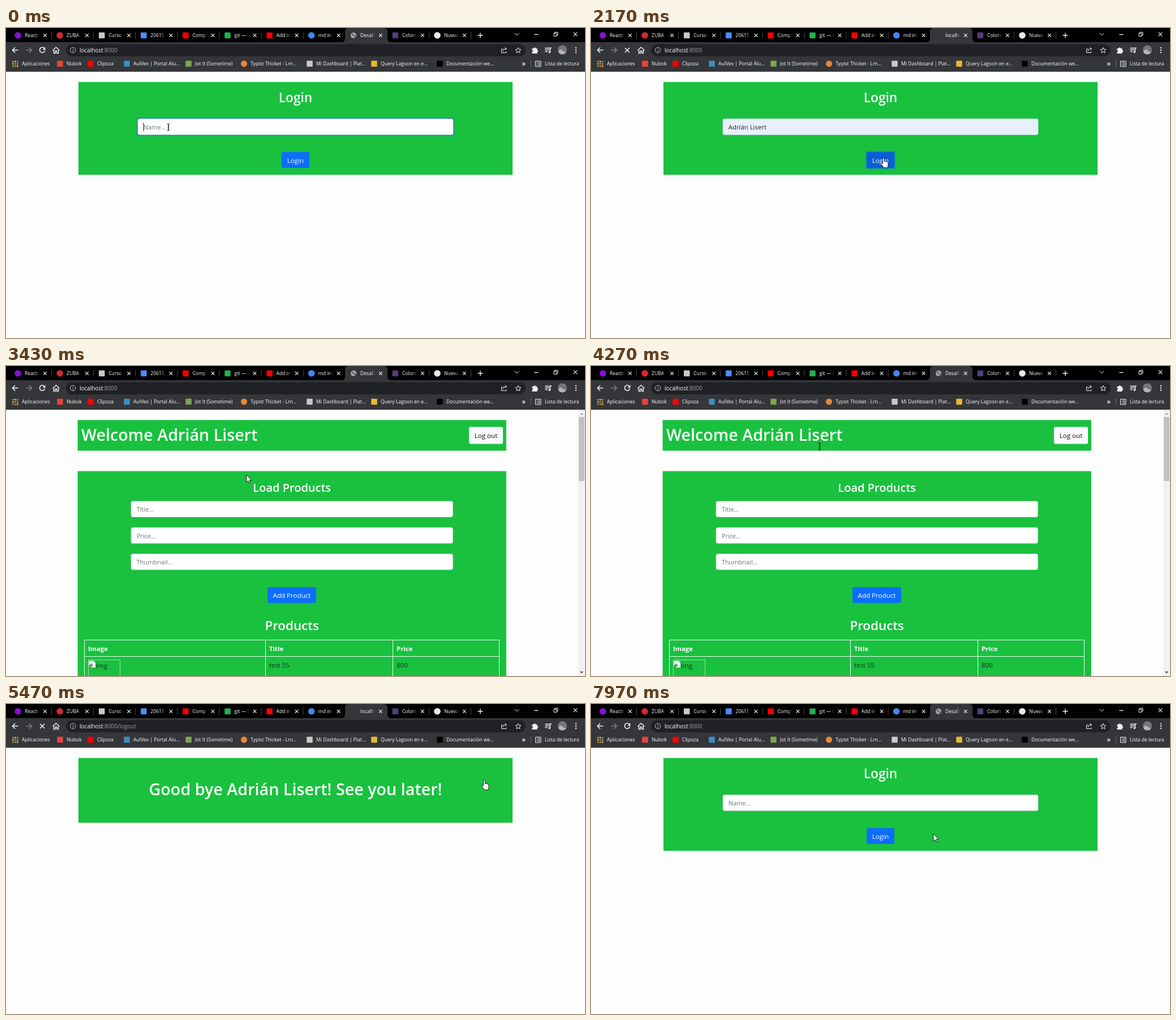
An HTML page for the animation above (8000 ms loop, 1023 by 547 pixels).

```html
<!DOCTYPE html>
<html lang="es">
<head>
<meta charset="utf-8">
<title>Login demo</title>
<style>
  html, body { margin: 0; width: 100%; height: 100%; overflow: hidden; background: #fdfdfd; }
  svg { display: block; }
  text { font-family: "Open Sans", "Noto Sans", sans-serif; white-space: pre; }
  .ui { font-size: 8.6px; fill: #fff; }
  .url { font-size: 9.9px; fill: #fff; }
  .dim { fill: #9aa0a6; }
  .body { font-size: 11.4px; fill: #212529; }
  .hint { font-size: 11px; fill: #6c757d; }
  .btn { font-size: 11.6px; text-anchor: middle; }
  .head { font-weight: 600; fill: #fff; }
  .mid { text-anchor: middle; }
  .line { fill: none; stroke: #f1f3f4; stroke-width: 1.4; }
</style>
</head>
<body>
<svg id="stage" width="1023" height="547" viewBox="0 0 1023 547"></svg>
<script>
const LOOP = 8000;
const USER = 'Adrián Lisert';
const GREEN = '#19c13f', BAR = '#35363a', BLUE = '#0d6efd';

const rect = (x, y, w, h, fill, r = 0, more = '') =>
  `<rect x="${x}" y="${y}" width="${w}" height="${h}" rx="${r}" fill="${fill}" ${more}/>`;
const dot = (x, y, r, fill) => `<circle cx="${x}" cy="${y}" r="${r}" fill="${fill}"/>`;
const square = (x, y, s, fill) => rect(x - s / 2, y - s / 2, s, s, fill, 1);
const text = (x, y, cls, s, more = '') => `<text x="${x}" y="${y}" class="${cls}" ${more}>${s}</text>`;
const head = (x, y, size, s, cls = 'mid') => text(x, y, 'head ' + cls, s, `font-size="${size}"`);
const line = (d, more = '') => `<path class="line" d="${d}" ${more}/>`;
const group = (id, s) => `<g id="${id}">${s}</g>`;
const cross = (x, y, r, w = 1.2) =>
  line(`M${x - r} ${y - r}l${2 * r} ${2 * r}m0 ${-2 * r}l${-2 * r} ${2 * r}`, `style="stroke-width:${w}"`);
const field = (x, y, w, hint) =>
  rect(x, y, w, 28, '#fff', 3, 'stroke="#ced4da" stroke-width=".7"') + text(x + 9.7, y + 18.6, 'hint', hint);

// Tabs: title, icon shape, icon colour
const tabs = [
  ['Reacts', dot, '#8710d8'], ['ZUBA', dot, '#d9272e'], ['Curso d', square, '#c9c9c9'],
  ['20615', square, '#4a8cff'], ['Comple', square, '#f00'], ['git — l', square, '#24b14c'],
  ['Add im', square, '#f00'], ['md ima', dot, '#4285f4'], null,
  ['Colors', square, '#563d7c'], ['Nueva p', dot, '#e8eaed']
];
const title = (x, s, fade) =>
  `<svg x="${x}" width="26" height="25">${text(0, 16, 'ui', s)}${rect(19, 4, 7, 18, `url(#${fade})`)}</svg>`;
const globe = dot(614, 13, 5, '#a9adb1') +
  '<path d="M610.5 11q3-2 4 0t-2 3zM614.5 14q3-2 4 0l-3 3.5z" fill="#55585c"/>';

function tabStrip() {
  let out = rect(0, 0, 1023, 26, '#000') +
    `<path d="M592 25q7 0 7-6V6q0-6 6-6h62q7 0 7 6v13q0 6 7 6z" fill="${BAR}"/>`;
  tabs.forEach((tab, i) => {
    const x = 21 + 74.1 * i;
    if (tab) {
      const [name, shape, color] = tab;
      out += shape(x, 13, shape === dot ? 5.8 : 10.5, color) + title(x + 12, name, 'fadeTab');
    }
    out += cross(x + 48, 13, 2.8);
    if (i !== 7 && i !== 8) out += rect(x + 59, 7, 1, 12, '#4a4b4e');
  });
  return out + group('ready', globe + title(626, 'Desafío', 'fadeBar')) +
    group('busy', title(626, 'localhost', 'fadeBar')) +
    line('M833.5 13h9m-4.5-4.5v9') + line('M898.5 9l4 4 4-4', 'style="stroke-width:1"') +
    line('M933.5 11.5h7') + line('M968 9.5h5v5h-5zM969.5 9.5v-2h5.5v5h-2', 'style="stroke-width:1"') +
    cross(1006, 11, 3.3, 1.1);
}

const bookmarks = [
  [107, 'Nubok', square, '#ea4335'], [161, 'Clipoza', square, '#f00'],
  [225, 'AulVex | Portal Alu...', square, '#3b8fc2'], [334, 'Jot It (Sometime)', square, '#7fa650'],
  [432, 'Typist Thicket - Lrn...', dot, '#e8873a'], [548, 'Mi Dashboard | Plat...', square, '#c9c9c9'],
  [662, 'Query Lagoon en e...', square, '#e8b92f'], [778, 'Documentación we...', square, '#000']
];

function toolbar() {
  let out = rect(0, 25, 1023, 52.2, BAR) + rect(106, 28.5, 812, 21.5, '#202124', 10.7) +
    line('M21.5 39h-10m4.7-4.7L11.5 39l4.7 4.7', 'style="stroke-width:1.6"') +
    line('M35.5 39h10m-4.7-4.7l4.7 4.7-4.7 4.7', 'style="stroke:#7d8085;stroke-width:1.6"') +
    group('reload', line('M68 36a4.7 4.7 0 1 0 .7 4', 'style="stroke-width:1.6"') +
      '<path d="M69.5 33.5v5h-5z" fill="#f1f3f4"/>') +
    group('stop', cross(64, 39, 4, 1.6)) +
    line('M82.5 39.5l6-5.5 6 5.5M84.5 39v5.5h2.7v-4h2.6v4h2.7V39') +
    line('M113.5 39a4.7 4.7 0 1 0 9.4 0a4.7 4.7 0 1 0-9.4 0M118.2 38.5v3.3m0-5.4v1.1', 'style="stroke:#c4c7cb;stroke-width:1"') +
    `<text x="130" y="42.8" class="url">localhost<tspan class="dim">:8000<tspan id="path"></tspan></tspan></text>` +
    line('M878.5 37h-3v6.5h8.5v-2M878 41q.5-4.5 6-4.5m-2.5-2.5l3 2.5-3 2.5', 'style="stroke-width:1"') +
    line('M905 34.5l1.4 3.2 3.5.3-2.7 2.3.8 3.5-3-1.9-3 1.9.8-3.5-2.7-2.3 3.5-.3z', 'style="stroke-width:1"') +
    '<path d="M929.5 36h3a1.7 1.7 0 0 1 3.4 0h2.6v3a1.7 1.7 0 0 1 0 3.4v2.6h-9v-3a1.5 1.5 0 0 0 0-3z" fill="#f1f3f4"/>' +
    line('M952.5 35.5h8m-8 3h8m-8 3h4.5M961.5 42.5v-7.3h2.5') + dot(960.2, 42.5, 1.7, '#f1f3f4') +
    dot(983, 38.5, 8, '#77747a') + '<path d="M976 42.5q3-7 7-3t7 2q-2 5-7 5t-7-4z" fill="#b9b4b3"/>';
  for (const y of [35, 39, 43]) out += dot(1007, y, 1.2, '#f1f3f4');

  const appColors = ['#ea6b5d', '#e8b93c', '#55a868'];
  for (let i = 0; i < 9; i++) {
    const col = i % 3, row = Math.floor(i / 3);
    out += rect(11 + col * 4, 58 + row * 4, 2.7, 2.7, appColors[(col + row) % 3]);
  }
  out += text(28, 66.3, 'ui', 'Aplicaciones');
  for (const [x, name, shape, color] of bookmarks)
    out += shape(x - 11.5, 63, shape === dot ? 5.5 : 10.5, color) + text(x, 66.3, 'ui', name);
  return out + head(911.5, 66.5, 12, '»', '') + rect(927, 57, 1, 12, '#6a6c70') +
    line('M935.5 58.5h9.5v9.5h-9.5zM937.5 61h1m1 0h4m-6 2.3h1m1 0h4m-6 2.3h1m1 0h4', 'style="stroke-width:1"') +
    text(952, 66.3, 'ui', 'Lista de lectura');
}

const loginPage = rect(128, 95.3, 767, 163.7, GREEN) + head(511.5, 131.3, 22.7, 'Login') +
  rect(231, 158, 561, 32.5, '#1592b0', 4.5, 'id="ring"') + field(233, 160.3, 557, '') +
  rect(233, 160.3, 557, 28, '#e8f0fe', 3, 'id="filled"') +
  text(242.7, 179, 'hint', 'Name...', 'id="hint"') + text(242.7, 178.8, 'body', '', 'id="typed"') +
  rect(0, 167, 1, 15, '#111', 0, 'id="caret"') +
  rect(485, 217, 53, 32, '#1795a0', 4, 'id="btnRing"') + rect(487, 219, 49, 28, BLUE, 3, 'id="btn"') +
  text(511.5, 237.5, 'btn', 'Login', 'fill="#fff"');

function shopPage() {
  let out = rect(126.6, 95.3, 757.3, 54.2, GREEN) + head(133, 131.5, 28.7, 'Welcome ' + USER, '') +
    rect(818, 107.5, 60, 30, '#f8f9fa', 3, 'id="logout"') + text(848, 127, 'btn', 'Log out', 'fill="#111"') +
    rect(126.6, 185.5, 757.3, 362, GREEN) + head(505.2, 221.5, 20, 'Load Products');
  ['Title...', 'Price...', 'Thumbnail...'].forEach((s, i) => out += field(221, 238.5 + 46.5 * i, 568.5, s));
  out += rect(462, 390, 86, 28, BLUE, 3) + text(505, 408.7, 'btn', 'Add Product', 'fill="#fff"') +
    head(505.2, 466, 22.4, 'Products') +
    line('M138.5 550V483.5h733V550M458.5 483.5V550M683.5 483.5V550M138.5 512.5h733', 'style="stroke-width:1;stroke:#e9fbee"');
  [[145, 'Image'], [465, 'Title'], [690, 'Price']].forEach(([x, s]) =>
    out += text(x, 502.5, 'body', s, 'style="font-weight:700;fill:#fff"'));
  return out + text(465, 531.5, 'body', 'test 55') + text(690, 531.5, 'body', '800') +
    rect(145.5, 518.5, 56, 56, 'none', 0, 'stroke="#b9cfbd"') +
    '<path d="M146.5 520h8l3.5 3.5V532h-11.5z" fill="#e9eef8"/><path d="M146.5 532v-3l4-4 3 3-4 4z" fill="#4f9b52"/>' +
    text(159, 533, 'body', 'Img') +
    rect(1011, 77.2, 12, 470, '#f1f1f1') + rect(1012, 90, 10, 113, '#c1c1c1') +
    '<path d="M1014 86l3-3.5 3 3.5z" fill="#a3a3a3"/><path d="M1014 539l3 3.5 3-3.5z" fill="#505050"/>';
}

const byePage = rect(128, 95.3, 767, 114.2, GREEN) +
  head(511.5, 161.4, 28.7, `Good bye ${USER}! See you later!`);

const cursors =
  group('arrow', '<path d="M0 0v13.2l3-2.7 2 4.4 2-.9-2-4.3h4z" fill="#fff" stroke="#111" stroke-width=".9"/>') +
  group('beam', line('M-2.5-6Q0-6 0-4.5v9Q0 6-2.5 6M2.5-6Q0-6 0-4.5v9Q0 6 2.5 6', 'style="stroke:#111;stroke-width:1"')) +
  group('hand', '<path d="M-1.5 1.5q0-1.5 1.4-1.5t1.4 1.5v5q1-.8 2.3.2 1.2-.6 2.2.4 2.2-.2 2.2 2v4q0 2-1.5 4.5H0q-1.5-3-4.5-6.5-1-1.6.5-2 1.2 0 2.5 1.8z" fill="#fff" stroke="#111" stroke-width=".9"/>');

const fade = (id, c) => `<linearGradient id="${id}"><stop offset="0" stop-color="${c}" stop-opacity="0"/><stop offset="1" stop-color="${c}"/></linearGradient>`;

const stage = document.getElementById('stage');
stage.innerHTML = `<defs>${fade('fadeTab', '#000')}${fade('fadeBar', BAR)}</defs>` + rect(0, 0, 1023, 547, '#fdfdfd') +
  group('login', loginPage) + group('shop', shopPage()) + group('bye', byePage) +
  tabStrip() + toolbar() + group('pointer', cursors);

const el = {};
stage.querySelectorAll('[id]').forEach(n => el[n.id] = n);
const show = (id, on) => el[id].style.display = on ? '' : 'none';

// Pointer path: time, x, y
const path = [
  [0, 287, 175], [450, 287, 175], [800, 305, 212], [1130, 370, 268], [1330, 398, 283], [1750, 517, 229],
  [2400, 517, 229], [2850, 440, 205], [3430, 425, 192], [3900, 414, 160], [4270, 404, 142], [4400, 410, 142],
  [4820, 845, 134], [6150, 845, 134], [6670, 790, 198], [7150, 690, 264], [7600, 622, 243], [7850, 605, 229], [LOOP, 605, 229]
];
// Pointer look, page and typed text, each from the given time on
const looks = [[0, 'beam'], [620, 'arrow'], [1680, 'hand'], [2360, 'arrow'], [4050, 'beam'], [4540, 'arrow'], [4720, 'hand'], [6180, 'arrow']];
const pages = [[0, 'login'], [2340, 'shop'], [5230, 'bye'], [7700, 'login']];
const typed = [[0, ''], [400, USER[0]], [780, USER], [7700, '']];
const loads = [[2000, 2480], [5050, 5700], [7560, 7820]];
const CLICK = 1950;

const at = (steps, t) => steps.filter(s => s[0] <= t).pop();

function pointerAt(t) {
  const i = Math.max(1, path.findIndex(p => p[0] > t));
  const [t0, x0, y0] = path[i - 1], [t1, x1, y1] = path[i];
  const u = (t - t0) / (t1 - t0), k = u * u * (3 - 2 * u);
  return [x0 + (x1 - x0) * k, y0 + (y1 - y0) * k];
}

function draw(t) {
  const page = at(pages, t)[1], look = at(looks, t)[1], [since, value] = at(typed, t);
  const busy = loads.some(([a, b]) => t >= a && t < b);
  const focus = t < CLICK, pressed = t >= CLICK && t < 2340;
  for (const id of ['login', 'shop', 'bye']) show(id, id === page);
  for (const id of ['arrow', 'beam', 'hand']) show(id, id === look);
  for (const id of ['busy', 'stop']) show(id, busy);
  for (const id of ['ready', 'reload']) show(id, !busy);
  el.path.textContent = page === 'bye' ? '/logout' : '';

  show('ring', focus);
  show('filled', value === USER);
  show('hint', !value);
  el.typed.textContent = value;
  show('caret', focus && (t - since) % 1060 < 530);
  el.caret.setAttribute('x', 242.5 + (value ? el.typed.getComputedTextLength() : 0));
  show('btnRing', pressed);
  el.btn.setAttribute('fill', pressed || (look === 'hand' && focus) ? '#0b5ed7' : BLUE);
  el.logout.setAttribute('fill', look === 'hand' ? '#e2e6ea' : '#f8f9fa');
  el.pointer.setAttribute('transform', `translate(${pointerAt(t)})`);
}

const start = performance.now();
function tick() {
  draw((performance.now() - start) % LOOP);
  requestAnimationFrame(tick);
}
tick();
</script>
</body>
</html>
```
